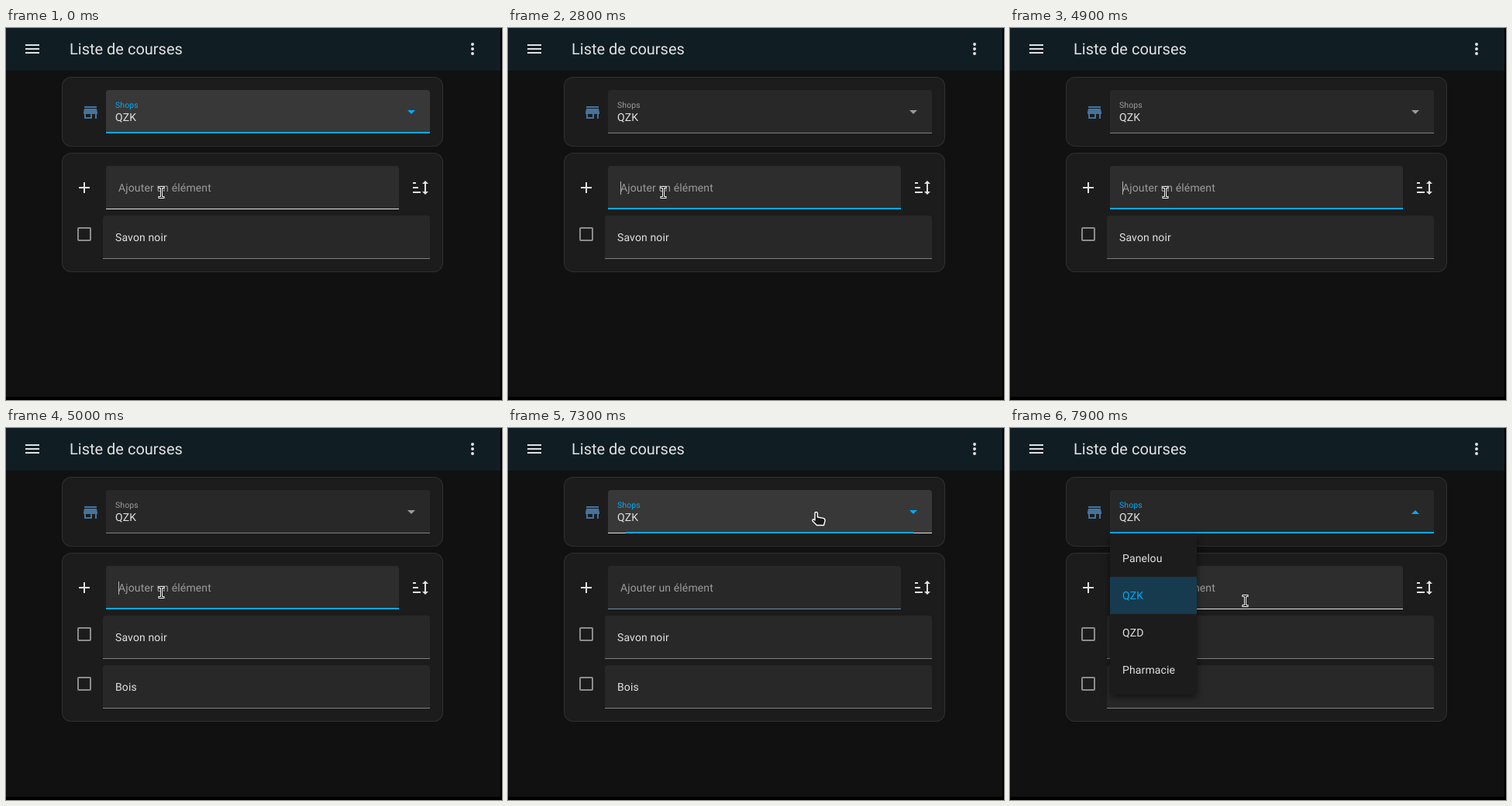
Recreate the animation shown at these times as an HTML page with a canvas. Size 640x480 px, loop 8 s.

```html
<!DOCTYPE html>
<html lang="fr">
<head>
<meta charset="utf-8">
<title>Liste de courses</title>
<style>
html, body { margin: 0; width: 100%; height: 100%; overflow: hidden; background: #000; }
canvas { display: block; }
</style>
</head>
<body>
<canvas id="stage" width="640" height="480"></canvas>
<script>
const ctx = document.getElementById('stage').getContext('2d');
const LOOP = 8000, STEP = 100;
const BLUE = '#03a9f4', TEXT = '#e1e1e1', MUTED = '#9b9b9b', LINE = '#7f7f7f', FIELD = '#282828';

const ICONS = {
  menu: 'M3 6H21V8H3ZM3 11H21V13H3ZM3 16H21V18H3Z',
  dots: 'M12 16a2 2 0 1 1 0 4a2 2 0 1 1 0-4M12 10a2 2 0 1 1 0 4a2 2 0 1 1 0-4M12 4a2 2 0 1 1 0 4a2 2 0 1 1 0-4',
  store: 'M12 18H6V14H12M21 14V12L20 7H4L3 12V14H4V20H14V14H18V20H20V14M20 4H4V6H20V4Z',
  plus: 'M19 13H13V19H11V13H5V11H11V5H13V11H19Z',
  sort: 'M18 21L14 17H17V7H14L18 3L22 7H19V17H22M2 19V17H12V19M2 13V11H9V13M2 7V5H6V7H2Z',
  down: 'M7 10L12 15L17 10Z',
  up: 'M7 15L12 10L17 15Z'
};
const POINTERS = {
  arrow: 'M0 0V15L3.7 11.6L6 17L8.5 16L6.2 10.8H11Z',
  hand: 'M-2 10V1.2a1.7 1.7 0 0 1 3.4 0V6L8.8 7.4Q11.5 8 11 11L9.5 16.5H.5L-5 11Q-5.6 8.8 -3.5 8.8Z',
  beam: 'M-2.5 -6.5H2.5M0 -6.5V6.5M-2.5 6.5H2.5'
};

const clamp = u => Math.max(0, Math.min(1, u));
const progress = (t, start, length) => clamp((t - start) / length);
const easeOut = u => 1 - (1 - u) ** 2.7;
const easeInOut = u => u * u * (3 - 2 * u);
const lerp = (a, b, u) => a + (b - a) * u;
const between = (t, a, b) => t >= a && t < b;

function mix(from, to, u) {
  const channel = (hex, i) => parseInt(hex.slice(i, i + 2), 16);
  return `rgb(${[1, 3, 5].map(i => Math.round(lerp(channel(from, i), channel(to, i), u)))})`;
}

function rect(x, y, w, h, color) {
  ctx.fillStyle = color;
  ctx.fillRect(x, y, w, h);
}

function rounded(x, y, w, h, radius, color) {
  ctx.beginPath();
  ctx.roundRect(x, y, w, h, radius);
  ctx.fillStyle = color;
  ctx.fill();
}

function text(str, x, y, color = TEXT, size = 14, spacing = 0.13) {
  ctx.font = `${size}px Roboto, sans-serif`;
  ctx.letterSpacing = spacing + 'px';
  ctx.fillStyle = color;
  ctx.fillText(str, x, y);
  return ctx.measureText(str).width;
}

function icon(name, x, y, color = TEXT) {
  ctx.save();
  ctx.translate(x, y);
  ctx.fillStyle = color;
  ctx.fill(new Path2D(ICONS[name]));
  ctx.restore();
}

function card(y, h) {
  rounded(72, y, 492, h, 12, '#303030');
  rounded(73, y + 1, 490, h - 2, 11, '#1c1c1c');
}

function field(x, y, w, fill, line) {
  rounded(x, y, w, 56, [4, 4, 0, 0], fill);
  rect(x, y + 55, w, 1, line);
}

// Focus line that grows from an origin point and fades away.
function focusLine(x, y, w, origin, scale, opacity) {
  ctx.globalAlpha = opacity;
  rect(lerp(origin, x, scale), y + 54, w * scale, 2, BLUE);
  ctx.globalAlpha = 1;
}

function pointerAt(t) {
  const there = easeInOut(progress(t, 6600, 600));
  const back = easeInOut(progress(t, 7500, 400));
  return {
    x: lerp(lerp(200, 398, there), 303, back),
    y: lerp(lerp(212, 109, there), 223, back)
  };
}

function drawPointer({ x, y }, kind) {
  const path = new Path2D(POINTERS[kind]);
  ctx.save();
  ctx.translate(Math.round(x), Math.round(y));
  ctx.strokeStyle = '#fff';
  if (kind === 'beam') {
    ctx.translate(0.5, 0);
    ctx.lineCap = 'square';
    ctx.lineWidth = 3;
    ctx.stroke(path);
    ctx.strokeStyle = '#000';
    ctx.lineWidth = 1;
    ctx.stroke(path);
  } else {
    ctx.fillStyle = '#1a1a1a';
    ctx.lineWidth = 1.4;
    ctx.lineJoin = 'round';
    ctx.fill(path);
    ctx.stroke(path);
  }
  ctx.restore();
}

function drawShops(t, hover) {
  const away = progress(t, 290, 180), focus = progress(t, 7200, 180);
  const tint = t < 4000 ? 1 - away : clamp(focus * 2);
  const accent = mix(MUTED, BLUE, tint);
  const overlay = t < 4000 ? 1 - progress(t, 290, 300)
    : clamp(focus * 2) * (1 - progress(t, 7400, 100));
  const base = hover && t < 7500 ? '#303030' : FIELD;

  card(63, 90);
  icon('store', 97, 97, '#44739e');
  field(129, 80, 418, mix(base, '#383838', overlay), hover ? TEXT : LINE);
  if (t < 4000) focusLine(129, 80, 418, 338, 1, 1 - easeOut(away));
  else focusLine(129, 80, 418, 338, easeOut(focus), 1);
  text('Shops', 141, 103, accent, 10.5, 0.1);
  text('QZK', 141, 120);
  icon(t >= 7600 ? 'up' : 'down', 511, 96, accent);
}

function drawItem(label, y) {
  ctx.strokeStyle = '#8c8c8c';
  ctx.lineWidth = 2;
  ctx.beginPath();
  ctx.roundRect(93, y + 16, 16, 16, 1);
  ctx.stroke();
  field(125, y, 422, FIELD, LINE);
  text(label, 141, y + 33);
}

function drawList(t, hover) {
  const added = t >= 5000;
  card(161, added ? 218 : 154);
  icon('plus', 89, 194);
  icon('sort', 523, 194);
  field(129, 178, 378, hover ? '#2d2d2d' : FIELD, hover ? TEXT : LINE);
  focusLine(129, 178, 378, 200, easeOut(progress(t, 290, 180)), 1 - easeOut(progress(t, 7200, 180)));

  const typed = t < 4900 ? 'Bois'.slice(0, [3000, 3300, 3600, 3800].filter(at => t >= at).length) : '';
  let caret = 145;
  if (typed) caret += text(typed, 145, 211);
  else text('Ajouter un élément', 145, 211, MUTED);
  const caretOn = [[400, 1600], [2800, 4000], [4900, 5200], [6400, 7200]].some(([a, b]) => between(t, a, b));
  if (caretOn) rect(Math.floor(caret), 198, 1, 17, '#b4b4b4');

  drawItem('Savon noir', 242);
  if (added) drawItem('Bois', 306);
}

function drawMenu(t) {
  if (t < 7400) return;
  const open = progress(t, 7350, 120), scale = lerp(0.8, 1, easeOut(open));
  ctx.save();
  ctx.translate(129, 136);
  ctx.scale(scale, scale);
  ctx.shadowColor = 'rgba(0,0,0,.5)';
  ctx.shadowBlur = 10;
  ctx.shadowOffsetY = 4;
  rounded(0, 0, 112, 208, [0, 0, 4, 4], '#1c1c1c');
  ctx.shadowColor = 'transparent';
  if (t >= 7600) rect(0, 56, 112, 48, '#173b4e');
  ['Panelou', 'QZK', 'QZD', 'Pharmacie'].forEach((name, i) =>
    text(name, 16, 37 + 48 * i, i === 1 ? BLUE : TEXT));
  ctx.restore();
}

function draw(t) {
  const pointer = pointerAt(t);
  const overShops = between(pointer.y, 80, 136);
  const overAdd = between(pointer.y, 178, 234);

  rect(0, 0, 640, 480, '#000');
  rect(0, 0, 638, 476, '#111');
  rect(0, 0, 638, 55, '#101e24');
  icon('menu', 22, 15);
  text('Liste de courses', 82, 34, TEXT, 20, 0);
  icon('dots', 590, 15);
  drawShops(t, overShops);
  drawList(t, overAdd);
  drawMenu(t);
  drawPointer(pointer, overShops ? 'hand' : overAdd ? 'beam' : 'arrow');
}

ctx.textRendering = 'geometricPrecision';
const start = performance.now();
function tick() {
  const t = (performance.now() - start) % LOOP;
  draw(Math.floor(t / STEP) * STEP);
  requestAnimationFrame(tick);
}
tick();
</script>
</body>
</html>
```
